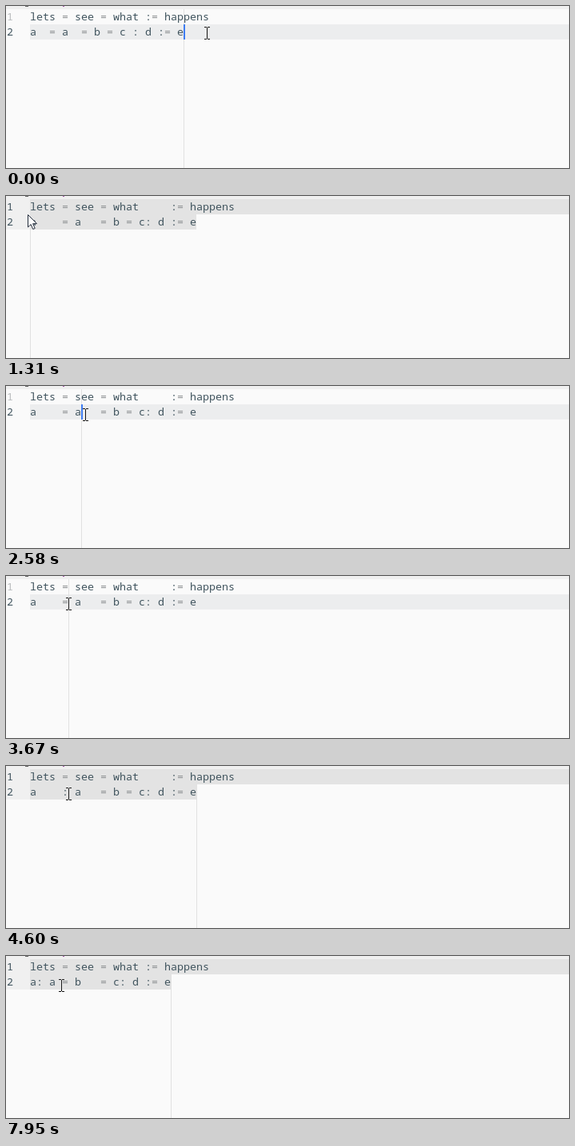
These frames come from a looping animation (704x203 px, 8 s). An HTML page:

```html
<!DOCTYPE html>
<html lang="en">
<head>
<meta charset="utf-8">
<title>Align selection</title>
<style>
html, body { margin: 0; width: 100%; height: 100%; overflow: hidden; background: #fafafa; }
#stage { position: absolute; left: 0; top: 0; width: 704px; height: 203px; overflow: hidden;
  background: #fafafa; isolation: isolate;
  font: 13.333px/18px "Noto Sans Mono", "DejaVu Sans Mono", monospace; color: #40545e; }
#stage div, #stage svg { position: absolute; }
.row1 { top: 4px; }
.row2 { top: 23px; }
.text { left: 30px; white-space: pre; }
.text i { font-style: normal; color: #8c8f91; }
.num { left: 1px; }
.band { left: 30px; width: 674px; height: 19px; background: #ecedee; }
.selected { background: #e3e3e3; }
#gutter { left: 0; width: 30px; height: 38px; background: #f0f0f0; }
#bar { left: 0; top: 0; width: 704px; height: 4px; background: #f0f0f0; }
#bar div { top: 0; height: 1px; }
#guide { top: 4px; width: 1px; height: 199px; background: #e1e1e1; }
#caret { width: 2px; height: 19px; background: #3f7df2; }
#popup { left: 77px; top: 41px; width: 200px; height: 85px; border: 1px solid #c9c9c9;
  border-radius: 4px; background: #f9f9f9; box-shadow: 0 1px 2px 2px rgba(0,0,0,.12); color: #2b3c47; }
#popup div { left: 5px; width: 185px; height: 25px; padding-left: 5px; line-height: 24px; }
#popup div:first-child { background: #e3e4e6; font-weight: 600; }
#beam { mix-blend-mode: difference; }
</style>
</head>
<body>
<div id="stage">
  <div id="bar">
    <div style="left:24px;width:4px;background:#666"></div>
    <div style="left:71px;width:2px;background:#a65cae"></div>
  </div>
  <div class="row1" id="gutter"></div>
  <div class="band row1 selected" id="band1"></div>
  <div class="band row2" id="band2"></div>
  <div class="band row2 selected" id="sel2"></div>
  <div id="guide"></div>
  <div class="num row1" id="num1">1</div>
  <div class="num row2">2</div>
  <div class="text row1" id="line1"></div>
  <div class="text row2" id="line2"></div>
  <div class="row2" id="caret"></div>
  <div id="popup">
    <div style="top:5px">a</div>
    <div style="top:30px">what</div>
    <div style="top:55px">happens</div>
  </div>
  <svg id="beam" width="7" height="16" shape-rendering="crispEdges" fill="#fff">
    <path d="M0 0h3v1h1v-1h3v1h-3v14h3v1h-3v-1h-1v1h-3v-1h3v-14h-3z"/>
  </svg>
  <svg id="arrow" width="13" height="20">
    <path d="M.5 .5V16l3.6-3.4 2.7 6 2.4-1.1-2.6-5.8h4.9z" fill="#fff" stroke="#222b3a"/>
  </svg>
</div>
<script>
const LOOP = 8000, TICK = 130;
const $ = id => document.getElementById(id);

// Mouse path: [time of first step, x, y, time of last step if it glides]
const path = [
  [0, 251, 34], [130, 34, 31], [270, 36, 10, 390], [520, 42, 30, 640],
  [780, 4, 2], [930, 27, 23], [1610, 63, 35], [1760, 190, 56],
  [2160, 99, 36, 2580], [2710, 78, 35, 2990],
  [6090, 118, 46], [6230, 174, 29, 6500], [6780, 184, 57, 7150],
  [7300, 176, 38], [7440, 100, 38, 7800], [7950, 69, 37]
];

// Editor actions; each changes part of the state before it
const erase = s => ({ text: s.text.slice(0, s.col - 1) + s.text.slice(s.col), col: s.col - 1 });
const type = c => s => ({ text: s.text.slice(0, s.col) + c + s.text.slice(s.col), col: s.col + 1 });
const selectAll = s => ({ sel: 2, col: s.text.length });
const click = col => () => ({ col, sel: 0 });
const set = change => () => change;

const actions = [
  [130, set({ col: 0, sel: 1 })],
  [270, set({ sel: 2 })],
  [1310, set({ gap: 5, text: "a    = a   = b = c: d := e" })],
  [2580, click(8)],
  [3130, click(6)],
  [3670, set({ blink: true })],
  [3810, s => ({ ...erase(s), blink: false })],
  [3940, type(":")],
  [4060, set({ popup: true })],
  [4200, set({ popup: false })],
  [4600, selectAll],
  [5160, s => selectAll(Object.assign(s, { gap: 1, text: "a: a = b   = c: d := e" }))]
];

const states = [{ time: 0, gap: 1, text: "a  = a  = b = c : d := e", col: 24, sel: 0 }];
for (const [time, act] of actions) {
  const next = { ...states.at(-1), time };
  states.push(Object.assign(next, act(next)));
}

const ease = p => p * p * (3 - 2 * p);
const show = (id, on) => { $(id).style.display = on ? "block" : "none"; };
const place = (id, x, y) => { $(id).style.transform = `translate(${x}px,${y}px)`; };
const paint = s => s.replace(/=/g, "<i>=</i>");

function mouseAt(t) {
  const i = path.findLastIndex(p => p[0] <= t);
  const [from, x, y, to = from] = path[i];
  if (t >= to) return [x, y];
  const gaps = Math.round((to - from) / TICK);
  const step = Math.floor((t - from) / (to - from) * gaps) + 1;
  const p = ease(step / (gaps + 1));
  const [, x0, y0] = path[i - 1];
  return [x0 + (x - x0) * p, y0 + (y - y0) * p].map(Math.round);
}

let shown;
function drawEditor(s) {
  if (s === shown) return;
  shown = s;
  const all = s.sel === 2;
  $("line1").innerHTML = paint("lets = see = what" + " ".repeat(s.gap) + ":= happens");
  $("line2").innerHTML = paint(s.text);
  $("guide").style.left = $("caret").style.left = 30 + s.col * 8 + "px";
  $("sel2").style.width = s.text.length * 8 + "px";
  $("num1").style.color = all ? "" : "#b9bcbe";
  show("gutter", all);
  show("band1", all);
  show("band2", !all);
  show("sel2", s.sel);
  show("caret", !s.sel && !s.blink);
  show("popup", s.popup);
}

function render(t) {
  drawEditor(states.findLast(s => s.time <= t));
  const [x, y] = mouseAt(t);
  const arrow = x < 30;
  show("beam", !arrow);
  show("arrow", arrow);
  place("beam", x - 3, y - 8);
  place("arrow", x, y);
}

const start = performance.now();
function tick() {
  render((performance.now() - start) % LOOP);
  requestAnimationFrame(tick);
}
tick();
</script>
</body>
</html>
```
